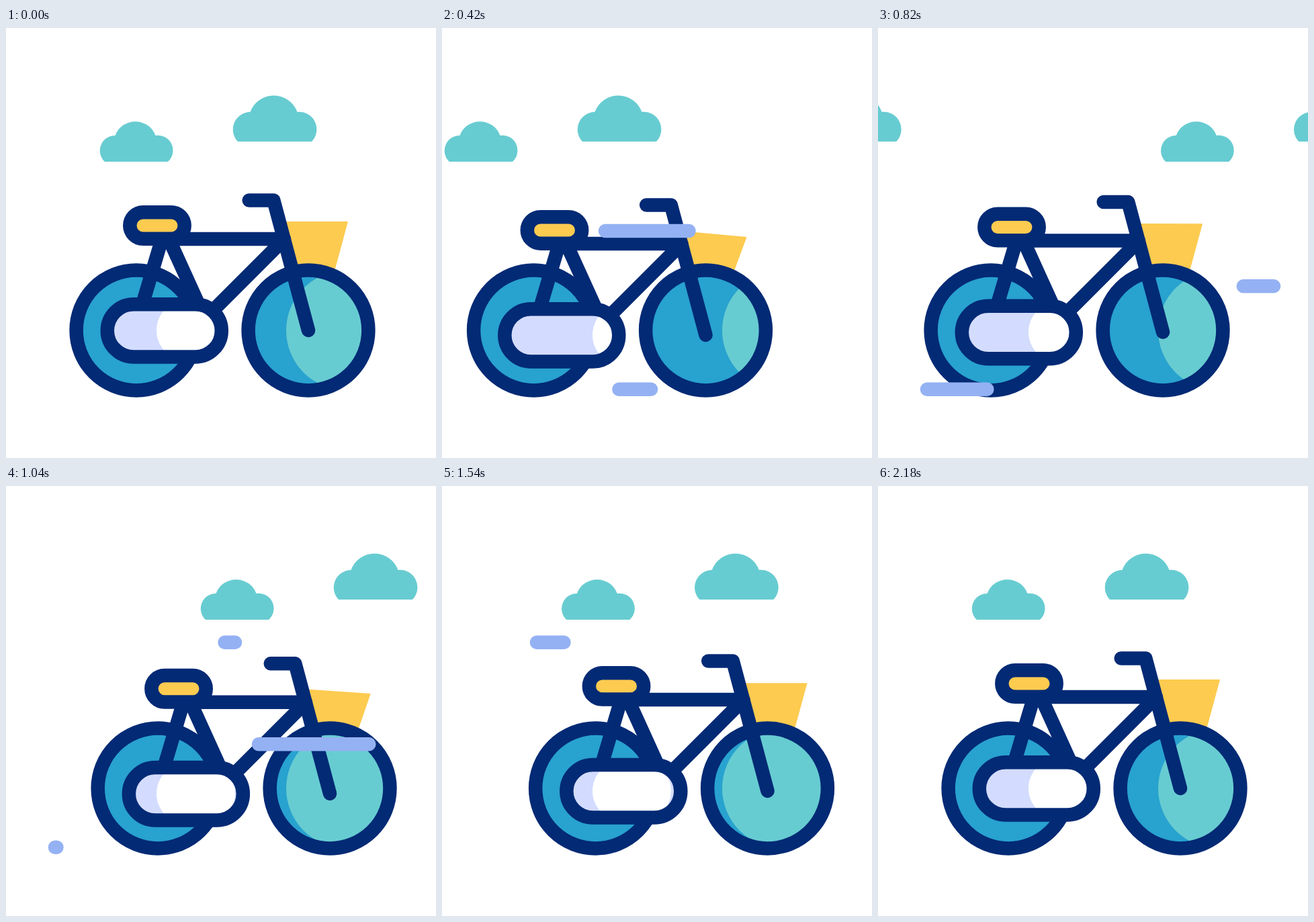
Write an HTML page that moves like this. It is 640 px wide and 640 px high and loops after 2420 ms.

```html
<!DOCTYPE html>
<html lang="en">
<head>
<meta charset="utf-8">
<title>Bicycle ride</title>
<style>
  html, body { margin: 0; width: 100%; height: 100%; overflow: hidden; background: #fff; }
  svg { display: block; width: 100vw; height: 100vh; }
  .teal { fill: #67ccd1; }
  .blue { fill: #28a2cf; }
  .yellow { fill: #fdcb50; }
  .pale { fill: #d3dcfe; }
  .line { stroke: #032a75; stroke-width: 20.5; stroke-linecap: round; stroke-linejoin: round; }
  .open { fill: none; }
  .streak { stroke: #94b1f3; stroke-width: 20.5; stroke-linecap: round; }
</style>
</head>
<body>
<svg viewBox="0 0 640 640">
  <defs>
    <clipPath id="tyre"><circle cx="450" cy="450" r="82"/></clipPath>
    <clipPath id="guard"><rect x="156" y="416" width="160" height="69" rx="34.5"/></clipPath>
    <g id="pair" class="teal">
      <path d="M147 199A22.5 22.5 0 0 1 162.5 160A32 32 0 0 1 222.5 160A22.5 22.5 0 0 1 241 199Z"/>
      <path d="M345 169A26 26 0 0 1 363.5 125A37.2 37.2 0 0 1 433.5 125A26 26 0 0 1 455 169Z"/>
    </g>
  </defs>

  <g id="clouds">
    <use href="#pair"/>
    <use href="#pair" x="709"/>
  </g>

  <g id="bike">
    <path id="basket" class="yellow" d="M407 288H509L485.5 375H432Z"/>
    <circle class="blue line" cx="194" cy="450" r="89.4"/>
    <circle class="blue" cx="450" cy="450" r="85"/>
    <g clip-path="url(#tyre)"><circle id="shine" class="teal" cy="450" r="89"/></g>
    <circle class="line open" cx="450" cy="450" r="89.4"/>
    <g id="body">
      <path class="line open" d="M232 314L204 408M242.5 314L287 412M236 314H409M414 314.5L311 417.5"/>
      <path class="line open" d="M361.7 256.5H398.3L450 450"/>
      <rect class="yellow line" x="184.3" y="274.3" width="81.4" height="39.4" rx="19.7"/>
      <rect class="pale" x="151" y="411" width="170" height="79" rx="39.3"/>
      <g clip-path="url(#guard)"><rect id="gloss" y="405" width="117" height="90" rx="45" fill="#fff"/></g>
      <rect class="line open" x="150.8" y="411.2" width="170" height="78.4" rx="39.2"/>
    </g>
  </g>

  <g id="streaks"></g>
</svg>
<script>
const LOOP = 2420, STEP = 20;
const $ = id => document.getElementById(id);
const clamp = u => Math.min(1, Math.max(0, u));
const smooth = u => { u = clamp(u); return u * u * (3 - 2 * u); };

// Curve from a to b with speeds va and vb at its ends
function glide(t, t0, t1, a, b, va = 0, vb = 0) {
  const d = t1 - t0, u = clamp((t - t0) / d), w = 1 - u;
  return a + (b - a) * smooth(u) + d * u * w * (va * w - vb * u);
}

// The bike falls back, surges ahead, then settles
function ride(t) {
  if (t < 560) return glide(t, 0, 560, 0, -66.7, -.047);
  if (t < 1242) return glide(t, 560, 1242, -66.7, 58.5);
  return glide(t, 1242, 1920, 58.5, 0);
}

// The clouds pick up speed, rush by, then slow to a stop
function drift(t) {
  if (t < 580) return glide(t, 0, 580, 0, -237, -.06, -.7);
  if (t < 1040) return glide(t, 580, 1040, -237, -559, -.7, -.32);
  return glide(t, 1040, 2180, -559, -709, -.32);
}

// Three down-and-up swings between 0 and 1
function bounce(t, start, half) {
  const p = (t - start) / half;
  return p <= 0 || p >= 6 ? 0 : smooth(1 - Math.abs(p % 2 - 1));
}

// A line that grows from its right end, then shrinks towards its left end
function streak(y, from, to, start, life = 802) {
  const el = document.createElementNS("http://www.w3.org/2000/svg", "line");
  el.setAttribute("class", "streak");
  el.setAttribute("y1", y);
  el.setAttribute("y2", y);
  $("streaks").appendChild(el);
  return t => {
    const p = (t - start) / life;
    const lead = smooth(p / .63), tail = smooth((p - .23) / .77);
    el.setAttribute("x1", from + (to - from) * lead);
    el.setAttribute("x2", from + (to - from) * tail);
    el.style.display = lead - tail > .001 ? "" : "none";
  };
}

const streaks = [
  streak(302, 425, 220, 20),
  streak(537.7, 311, 73, 275),
  streak(384.2, 589, 314, 690),
  streak(232.8, 341, 141, 960, 746)
];

const move = (id, x, y) => $(id).setAttribute("transform", `translate(${x} ${y})`);

function draw(t) {
  const x = ride(t);
  move("bike", x, 0);
  move("body", 0, 7.8 * bounce(t, 10, 340));
  move("clouds", drift(t), 0);

  // Highlights stay put on the stage while the bike passes
  $("shine").setAttribute("cx", 506 - x);
  $("gloss").setAttribute("x", 224 - x);

  const tilt = 6.2 * bounce(t, 170, 337), drop = 13.2 * bounce(t, 35, 340);
  $("basket").setAttribute("transform", `translate(0 ${drop}) rotate(${tilt} 394 317)`);

  streaks.forEach(show => show(t));
}

const begin = performance.now();
function tick() {
  const t = (performance.now() - begin) % LOOP;
  draw(Math.floor(t / STEP) * STEP);
  requestAnimationFrame(tick);
}
draw(0);
requestAnimationFrame(tick);
</script>
</body>
</html>
```
